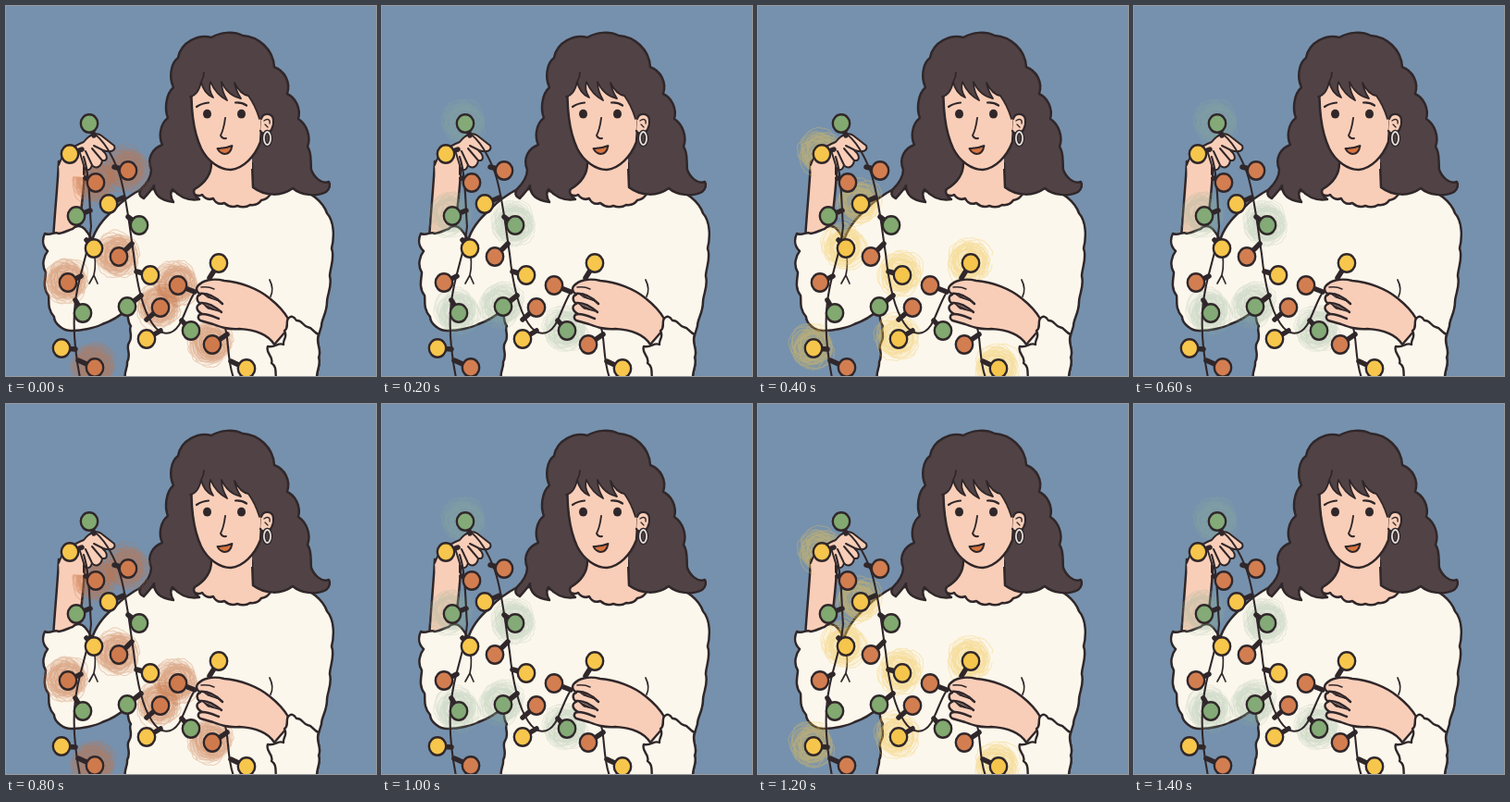
Animation, 400 px wide and 400 px high, one loop 1600 ms. Source, as an HTML page with a canvas:

```html
<!DOCTYPE html>
<html lang="en">
<head>
<meta charset="utf-8">
<title>String lights</title>
<style>
html, body { margin: 0; width: 100%; height: 100%; overflow: hidden; background: #7691ad; }
canvas { display: block; width: 100vw; height: 100vh; }
</style>
</head>
<body>
<canvas id="stage" width="400" height="400"></canvas>
<script>
const ctx = document.getElementById('stage').getContext('2d');
const INK = '#30272a', HAIR = '#514345', SKIN = '#f9ceb8', KNIT = '#fcf7ec';
const STEP = 200;
const ORDER = ['red', 'green', 'yellow', 'green'];

// Each bulb: x, y, then the point where its socket meets the wire
const LIGHTS = {
  red: {
    fill: '#d37e51', glow: '196,112,66', wash: 0.32, line: 0.3,
    bulbs: [[132, 178, 117, 174], [97, 191, 86, 186], [122, 271, 136, 257], [67, 299, 81, 292],
      [186, 302, 204, 309], [167, 326, 152, 339], [223, 366, 239, 355], [96, 391, 78, 383]]
  },
  yellow: {
    fill: '#f7c64c', glow: '240,196,78', wash: 0.22, line: 0.32,
    bulbs: [[69, 160, 82, 155], [111, 214, 127, 207], [95, 262, 87, 253], [156, 291, 141, 287],
      [230, 278, 220, 294], [152, 360, 167, 351], [60, 370, 75, 371], [260, 392, 243, 384]]
  },
  green: {
    fill: '#81a970', glow: '142,177,148', wash: 0.18, line: 0.2,
    bulbs: [[90, 127, 95, 140], [76, 227, 91, 221], [144, 237, 132, 228], [83, 332, 75, 318],
      [131, 325, 146, 313], [200, 351, 190, 340]]
  }
};

function shape(d, fill, width = 2.5, color = INK) {
  const p = new Path2D(d);
  if (fill) {
    ctx.fillStyle = fill;
    ctx.fill(p);
  }
  if (width) {
    ctx.lineWidth = width;
    ctx.strokeStyle = color;
    ctx.stroke(p);
  }
}

const line = (d, width) => shape(d, null, width);

function oval(x, y, rx, ry, fill, width = 0, color = INK) {
  ctx.beginPath();
  ctx.ellipse(x, y, rx, ry, 0, 0, Math.PI * 2);
  if (fill) {
    ctx.fillStyle = fill;
    ctx.fill();
  }
  if (width) {
    ctx.lineWidth = width;
    ctx.strokeStyle = color;
    ctx.stroke();
  }
}

function seeded(seed) {
  return () => (seed = seed * 16807 % 2147483647) / 2147483647;
}

function drawBody() {
  shape('M206 165L200 208L220 222H290L292 196L267 160Z', SKIN, 0);
  shape('M57 168C56 192 53 220 51 252H77C81 222 85 200 85 172Z', SKIN);
  shape('M200 202Q207 207 212 204Q217 211 224 208Q228 216 236 213Q243 219 250 216' +
    'Q258 219 264 215Q272 216 276 210Q283 209 286 203C294 201 302 199 312 196' +
    'C329 200 343 212 347 224C355 233 355 250 352 262C356 272 350 284 350 292' +
    'C353 303 347 312 347 320C347 332 341 338 341 346L338 356C334 364 342 372 338 380' +
    'C341 388 335 394 336 404H129C127 396 132 390 131 385C136 376 129 370 133 364' +
    'C138 357 132 350 135 346C131 341 132 334 131 328C122 336 113 341 104 344' +
    'C96 348 82 351 72 351C62 352 52 343 52 336C44 327 47 318 46 313' +
    'C39 304 43 294 43 288C38 280 41 270 45 265C38 258 40 250 42 246' +
    'C49 249 52 243 57 246C64 245 68 242 72 241C76 236 82 238 85 241' +
    'C90 247 92 250 93 254C96 242 105 230 118 219C127 209 137 203 148 197Z', KNIT);
  line('M94 260C97 272 97 283 95 291L99 300M95 291L90 300', 1.7);
  line('M285 296C288 302 289 308 286 314', 1.7);
}

function drawHead() {
  shape('M222 34C208 30 189 39 186 56C178 62 176 77 181 88C173 95 171 111 175 121' +
    'C166 128 165 142 169 150C158 154 152 165 157 177' +
    'C157 187 150 194 146 198C143 202 144 206 149 208C152 204 157 200 160 194' +
    'C160 202 165 210 181 212C178 207 177 202 180 198C188 207 197 211 209 209' +
    'C203 205 202 200 204 198C214 192 222 184 222 170H266L267 196' +
    'C280 206 298 206 310 197C318 204 335 207 346 201C350 198 351 193 349 190' +
    'C341 193 333 185 330 177C329 168 331 160 326 152C330 141 325 128 316 122' +
    'C319 111 313 99 304 95C308 82 301 70 290 66C289 47 273 33 256 32C246 27 232 28 222 34Z', HAIR);
  shape('M223 165V176H266V152Z', SKIN, 0);
  shape('M201 76C199 110 203 137 211 154C218 168 231 177 243 177C256 176 269 163 275 147L277 120L264 76Z', SKIN);
  const fringe = 'M199 98C205 97 209 91 211 82C213 91 217 96 224 99C220 93 219 88 221 82' +
    'C225 91 231 98 239 102C235 95 233 89 233 82C237 91 244 98 254 100' +
    'C250 94 248 89 247 83C251 91 256 96 262 97C267 104 271 112 274 122';
  shape(fringe + 'L283 118L284 60L196 62Z', HAIR, 0);
  line(fringe + 'M211 82Q214 77 214 72', 1.8);
  shape('M276 122C278 115 288 115 289 123C290 130 286 138 281 138C278 138 276 137 275 135', SKIN, 2.2);
  line('M279 124C283 121 286 123 285 127M280 128L283 131', 1.3);
  oval(282.5, 143, 3.6, 7, null, 4.4);
  oval(282.5, 143, 3.6, 7, null, 1.8, '#e3dfda');

  oval(217.5, 116.7, 4.5, 4.9, INK);
  oval(254.5, 116.7, 4.5, 4.9, INK);
  line('M206 109Q212 105 219 104.5M248 104.5Q255 104 260 107.5', 2.2);
  line('M237 121C236 129 235 134 232 140Q234 144 238 143', 1.9);
  shape('M228.5 154Q236 154.5 244.5 151Q243 160 236 160Q231 159 228.5 154Z', '#d9743f', 1.9);
}

function drawLeftHand() {
  const hand = 'M57 172C60 161 71 152 84 147C90 139 98 136 103 140L117 151C119 156 114 159 105 156';
  shape(hand + 'C111 162 110 168 104 167C103 174 97 177 93 172C91 179 85 179 84 172L84 185L58 183Z', SKIN, 0);
  line(hand + 'L95 151M104 156C111 162 110 168 104 167L93 154M104 167C103 174 97 177 93 172L86 157' +
    'M93 172C91 179 85 179 84 172L80 159M84 174V182', 2);
}

function drawRightHand() {
  shape('M207 303C213 296 224 294 236 297C253 298 273 306 285 316C295 324 301 331 305 338' +
    'L303 351L290 366C284 356 270 350 252 349C240 350 232 347 224 344L210 340C206 337 208 333 212 333' +
    'C205 329 205 324 210 322C205 318 206 313 210 312C206 309 205 306 207 303Z', SKIN, 2.4);
  line('M209 311C218 310 226 314 234 322M210 321C218 320 226 325 233 331M212 333C219 333 225 336 230 338', 2.5);
  line('M211 304Q219 303 225 306', 1.5);
  shape('M213 311L230 319L218 315ZM213 322L230 330L218 327Z', INK, 1);
  shape('M306 337C301 340 307 348 301 351C305 358 299 360 300 366C294 363 291 370 283 368' +
    'C280 376 290 379 287 386C293 390 291 396 292 404H336C335 394 341 388 338 380' +
    'C342 372 334 364 338 355C332 353 332 348 326 347C321 346 320 339 314 340C311 335 308 335 306 337Z', KNIT, 2.4);
}

// Soft wash under loose, wandering pencil rings
function drawGlow({ bulbs, glow, wash, line: alpha }) {
  bulbs.forEach(([bx, by], i) => {
    const rnd = seeded(911 + i * 577 + bx * 31);
    const x = bx - 2, y = by - 2;
    const soft = ctx.createRadialGradient(x, y, 8, x, y, 24);
    soft.addColorStop(0, `rgba(${glow},${wash * 1.5})`);
    soft.addColorStop(0.7, `rgba(${glow},${wash})`);
    soft.addColorStop(1, `rgba(${glow},0)`);
    oval(x, y, 24, 24, soft);
    ctx.strokeStyle = `rgba(${glow},${alpha})`;
    ctx.lineWidth = 1.1;
    ctx.beginPath();
    const turns = 14, phase = rnd() * 6, tilt = rnd() * 6;
    for (let a = 0; a < turns * Math.PI * 2; a += 0.16) {
      const r = 17 + 4 * Math.sin(a * 0.37 + phase) + 1.8 * Math.sin(a * 2.3 + tilt) + (rnd() - 0.5) * 1.6;
      const px = x + Math.cos(a) * r + 4 * Math.sin(a * 0.21 + tilt);
      const py = y + Math.sin(a) * r + 4 * Math.cos(a * 0.17 + phase);
      a ? ctx.lineTo(px, py) : ctx.moveTo(px, py);
    }
    ctx.stroke();
  });
}

function drawString(lit) {
  line('M94 137C107 146 116 164 122 180C130 203 133 235 138 268C141 297 146 325 158 343' +
    'C167 357 179 357 187 345C195 332 199 311 211 302', 2.1);
  line('M237 348C241 361 239 383 246 402', 2.1);
  line('M84 163C91 184 90 216 92 238C90 263 81 285 77 307C71 337 74 372 80 402', 2.1);
  const all = Object.values(LIGHTS);
  for (const { bulbs } of all) {
    for (const [x, y, wx, wy] of bulbs) line(`M${x} ${y}L${wx} ${wy}`, 5.5);
  }
  for (const { bulbs, fill } of all) {
    for (const [x, y] of bulbs) oval(x, y, 9.2, 9.7, fill, 2.4);
  }
  for (const [x, y] of lit.bulbs) oval(x, y, 8, 8.5, `rgba(${lit.glow},0.2)`);
}

function draw(lit) {
  ctx.lineCap = ctx.lineJoin = 'round';
  ctx.fillStyle = '#7691ad';
  ctx.fillRect(0, 0, 400, 400);
  drawBody();
  drawHead();
  drawGlow(lit);
  drawLeftHand();
  drawString(lit);
  drawRightHand();
}

let shown = null;
function tick() {
  const lit = LIGHTS[ORDER[Math.floor(performance.now() / STEP) % ORDER.length]];
  if (lit !== shown) draw(shown = lit);
  requestAnimationFrame(tick);
}
tick();
</script>
</body>
</html>
```
